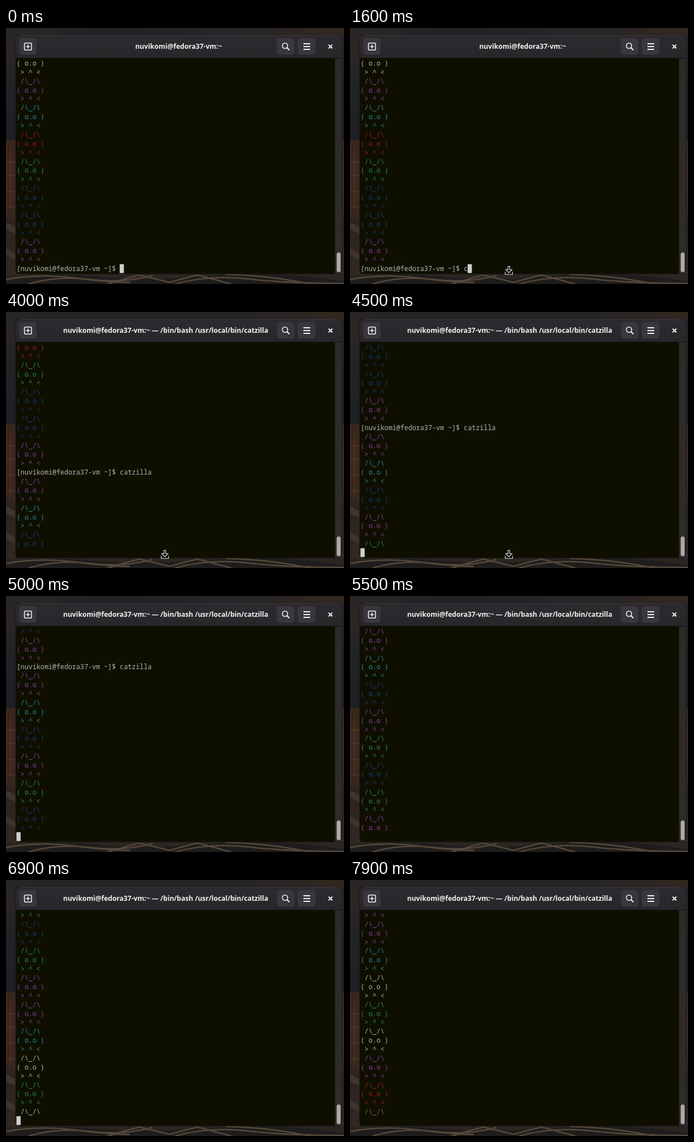
An HTML page that plays this animation: 600x455 px, repeating every 8 s.

```html
<!DOCTYPE html>
<html lang="en">
<head>
<meta charset="utf-8">
<title>Terminal cats</title>
<style>
  html, body { margin: 0; width: 100%; height: 100%; overflow: hidden; background: #211d1d; }
  svg { display: block; width: 100vw; height: 100vh; }
  .title { font: 700 12.1px "Noto Sans", "Open Sans", sans-serif; fill: #f2f2f2; text-anchor: middle; }
  .line { font: 11.75px "Noto Sans Mono", "DejaVu Sans Mono", monospace; white-space: pre; fill-opacity: .86; }
</style>
</head>
<body>
<svg viewBox="0 0 600 455" preserveAspectRatio="none">
  <defs>
    <linearGradient id="wall" x1="0" y1="0" x2="0" y2="1">
      <stop offset="0" stop-color="#292624"/>
      <stop offset=".14" stop-color="#282524"/>
      <stop offset=".22" stop-color="#212226"/>
      <stop offset=".435" stop-color="#1f2025"/>
      <stop offset=".44" stop-color="#3a261c"/>
      <stop offset=".55" stop-color="#442d21"/>
      <stop offset=".7" stop-color="#3f2a1f"/>
      <stop offset=".76" stop-color="#2d231e"/>
      <stop offset="1" stop-color="#332a23"/>
    </linearGradient>
    <linearGradient id="ceiling">
      <stop offset="0" stop-color="#292625"/>
      <stop offset=".3" stop-color="#232225"/>
      <stop offset=".75" stop-color="#282526"/>
      <stop offset="1" stop-color="#33281f"/>
    </linearGradient>
    <linearGradient id="bar" x1="0" y1="0" x2="0" y2="1">
      <stop offset="0" stop-color="#2d2b2f"/>
      <stop offset="1" stop-color="#272629"/>
    </linearGradient>
    <clipPath id="floor"><rect y="437" width="600" height="18"/></clipPath>
  </defs>

  <rect width="600" height="455" fill="url(#wall)"/>
  <rect width="600" height="13" fill="url(#ceiling)"/>
  <path d="M0 238H17M0 262H17M0 290H17M0 318H17" stroke="#50382a" stroke-width="2"/>
  <path d="M4 206V330M12 206V330" stroke="#2e1f18"/>
  <path d="M0 345L17 354V366L0 358ZM0 392L17 402V412L0 404Z" fill="#3f352d"/>
  <g clip-path="url(#floor)">
    <rect y="437" width="600" height="18" fill="#2a2521"/>
    <path d="M0 450Q60 434 130 440T260 446T390 438T600 450V455H0Z" fill="#1f1d1c"/>
    <g fill="none" stroke="#55483a" stroke-width="2.500">
      <path d="M0 447Q60 436 120 444T220 452M40 455Q90 440 150 447T260 440"/>
      <path d="M180 455L236 439L290 452L340 439L400 455"/>
      <path d="M300 455Q360 438 430 446T600 454M390 438Q470 440 540 455"/>
    </g>
  </g>

  <rect x="16.5" y="11.5" width="581" height="426" rx="8" fill="#161515"/>
  <path d="M17.500 54V20Q17.500 12.500 25 12.500H589Q596.500 12.500 596.500 20V54Z" fill="url(#bar)"/>
  <path d="M25 12.500H589" stroke="#39373a"/>
  <rect x="18" y="54" width="566" height="382.500" fill="#0f0f00"/>
  <rect x="584" y="54" width="12.500" height="382.500" fill="#2d2c2b"/>
  <path d="M17 53.500H597" stroke="#121113"/>
  <rect x="587" y="399" width="7" height="35" rx="3.500" fill="#aaa9a7"/>

  <g fill="#39373b">
    <rect x="23.500" y="18" width="30.500" height="29.500" rx="5"/>
    <rect x="481" y="18" width="31" height="29.500" rx="5"/>
    <rect x="518" y="18" width="31" height="29.500" rx="5"/>
  </g>
  <g fill="none" stroke="#f2f2f2" stroke-width="1.600">
    <rect x="32.700" y="26.700" width="12.600" height="12.600" rx="2"/>
    <path d="M39 29.500V36.500M35.500 33H42.500"/>
    <circle cx="495.300" cy="31.500" r="4.700"/>
    <path d="M498.700 35L503 39.300" stroke-width="2"/>
    <path d="M528 28H540M528 33H540M528 38H540" stroke-width="1.800"/>
    <path d="M572.700 29.700L579.300 36.300M579.300 29.700L572.700 36.300" stroke-width="2"/>
  </g>

  <text class="title" id="title" y="37"></text>
  <g id="rows"></g>
  <rect id="cursor" width="7.500" height="15.700" fill="#d0cfcc"/>
  <path id="pointer" d="M280.500 423.500H283.500V429.500H287.500L282 435L276.500 429.500H280.500ZM275.500 433.500V438H288.500V433.500" fill="#111" stroke="#dedede" stroke-width="1.100"/>
</svg>

<script>
  const LOOP = 8000, ROWS = 24, LEFT = 18.8, CELL = 7.05, PITCH = 15.87, LAST_BASE = 432;
  const USER = "nuvikomi@fedora37-vm";
  const PROMPT = `[${USER} ~]$ `, COMMAND = "catzilla", PROMPT_LINE = 23;
  const KEYS = [1600, 1700, 2000, 2300, 2500, 2600, 2800, 2900];
  const ENTER = 3300, STEP = 100, STALL = 7500, BLINK = 600;
  const CAT = [" /\\_/\\", "( o.o )", " > ^ <"];
  const COLORS = {
    r: "#c01c28", g: "#26a269", y: "#a2734c", b: "#12488b",
    m: "#a347ba", c: "#2aa1b3", w: "#d0cfcc"
  };
  const OLD_CATS = "wmcrgbbm", NEW_CATS = "mcbmgbgmmcwgwmry";

  const get = id => document.getElementById(id);
  const title = get("title"), cursor = get("cursor"), pointer = get("pointer");
  const show = (el, on) => el.setAttribute("visibility", on ? "visible" : "hidden");
  const baseline = row => LAST_BASE - (ROWS - 1 - row) * PITCH;

  const rows = Array.from({ length: ROWS }, (_, i) => {
    const el = document.createElementNS("http://www.w3.org/2000/svg", "text");
    el.setAttribute("class", "line");
    el.setAttribute("x", LEFT);
    el.setAttribute("y", baseline(i));
    return get("rows").appendChild(el);
  });

  function setText(el, text) {
    if (el.textContent !== text) el.textContent = text;
  }

  function catLine(cats, n) {
    return [CAT[n % 3], COLORS[cats[Math.floor(n / 3)]]];
  }

  function lineAt(index, end, typed) {
    if (index === PROMPT_LINE) return [PROMPT + COMMAND.slice(0, typed), COLORS.w];
    if (index >= end) return ["", COLORS.w];
    return index < PROMPT_LINE
      ? catLine(OLD_CATS, index + 1)
      : catLine(NEW_CATS, index - PROMPT_LINE - 1);
  }

  function cursorOn(t) {
    if (t < KEYS[0]) return t < 500 || t >= 1100;
    return t < ENTER || Math.floor((t - ENTER) / BLINK) % 2 === 0;
  }

  function render(t) {
    const running = t >= ENTER;
    const typed = KEYS.filter(k => t >= k).length;
    const printed = Math.floor((t - ENTER) / STEP) + 1 - (t >= STALL ? 1 : 0);
    const end = running ? PROMPT_LINE + 1 + printed : PROMPT_LINE;
    const scroll = end - PROMPT_LINE;

    rows.forEach((el, i) => {
      const [text, color] = lineAt(i + scroll, end, typed);
      setText(el, text);
      el.setAttribute("fill", color);
    });

    setText(title, running ? `${USER}:~ — /bin/bash /usr/local/bin/${COMMAND}` : `${USER}:~`);
    title.setAttribute("x", running ? 283.5 : 306.5);

    const column = running ? 0 : PROMPT.length + typed;
    cursor.setAttribute("x", LEFT - 0.3 + column * CELL);
    cursor.setAttribute("y", LAST_BASE - 12.2);
    show(cursor, cursorOn(t));
    show(pointer, t >= 1100 && t < 4600);
  }

  function tick() {
    render(performance.now() % LOOP);
    requestAnimationFrame(tick);
  }
  tick();
</script>
</body>
</html>
```
